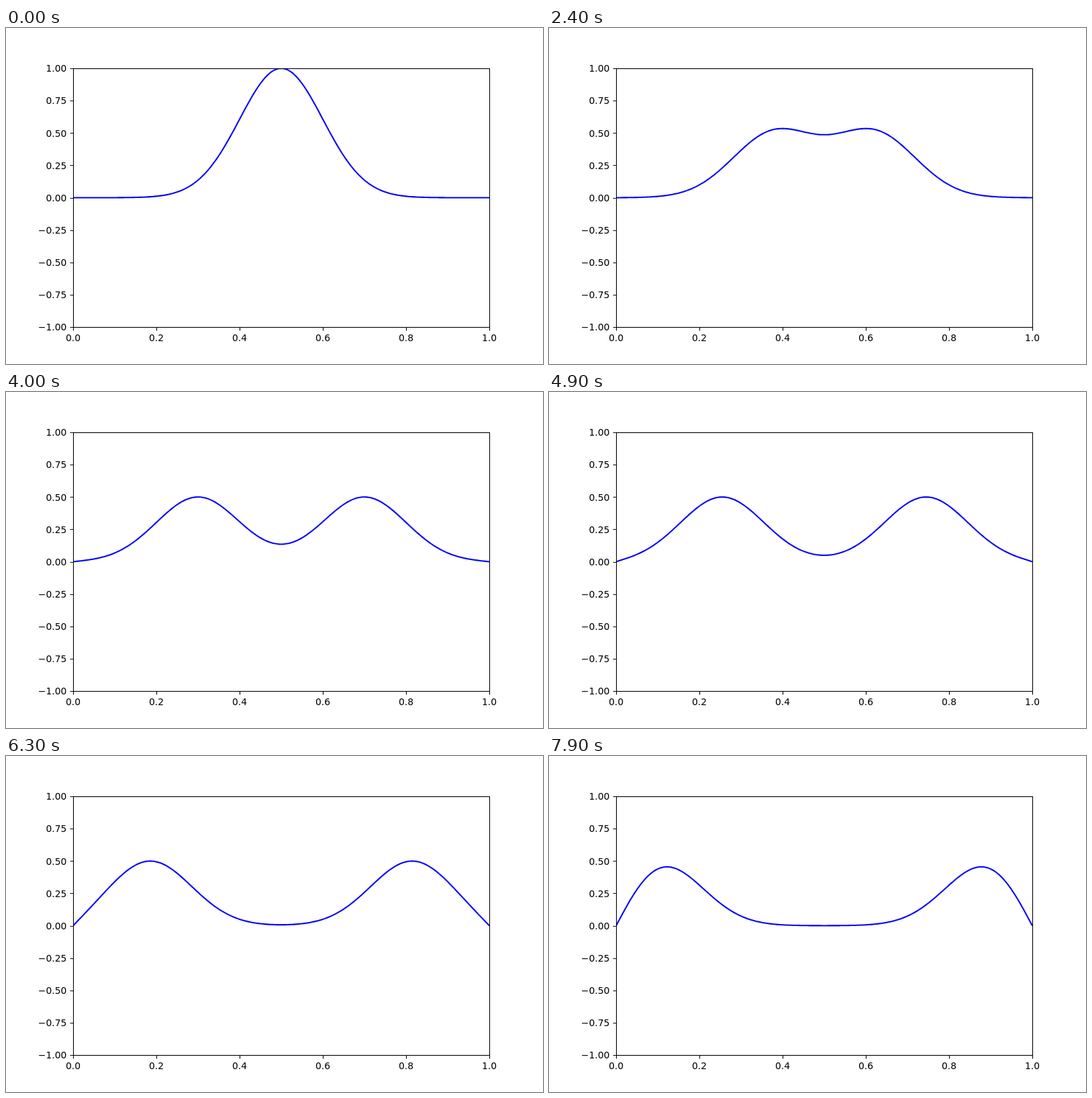
Animation, 800 px wide and 500 px high, one loop 8 s. Source, as an HTML page:

```html
<!DOCTYPE html>
<html lang="en">
<head>
<meta charset="utf-8">
<title>Vibrating string</title>
<style>
  html, body { margin: 0; width: 100%; height: 100%; overflow: hidden; background: #fff; }
  svg { display: block; }
  text { font: 13.889px "DejaVu Sans", sans-serif; fill: #000; }
  .axis { fill: none; stroke: #000; stroke-width: 1.11; }
  #wave { fill: none; stroke: #00f; stroke-width: 2.083; stroke-linejoin: round; }
</style>
</head>
<body>
<svg width="800" height="500" viewBox="0 0 800 500">
  <clipPath id="plot"><rect x="100" y="60" width="620" height="385"/></clipPath>
  <path id="wave" clip-path="url(#plot)"/>
  <path id="ticks" class="axis"/>
  <rect class="axis" x="100.5" y="60.5" width="620" height="385"/>
  <g id="labels"></g>
</svg>
<script>
const LOOP = 8000, STEP = 100, SHIFT = 0.005, SAMPLES = 200;
const byId = id => document.getElementById(id);
const px = x => 100 + 620 * x;
const py = y => 252.5 - 192.5 * y;

function addLabel(value, digits, x, y, anchor) {
  const label = document.createElementNS("http://www.w3.org/2000/svg", "text");
  label.setAttribute("x", x);
  label.setAttribute("y", y);
  label.setAttribute("text-anchor", anchor);
  label.textContent = value.toFixed(digits).replace("-", "\u2212");
  byId("labels").append(label);
}

function drawAxes() {
  let d = "";
  for (let i = 0; i <= 5; i++) {
    const x = Math.round(px(i / 5));
    d += `M${x + 0.5} 445.5v5`;
    addLabel(i / 5, 1, x, 466, "middle");
  }
  for (let i = -4; i <= 4; i++) {
    const y = py(i / 4);
    d += `M100.5 ${Math.round(y) + 0.5}h-5`;
    addLabel(i / 4, 2, 90.3, Math.round(y + 5.3), "end");
  }
  byId("ticks").setAttribute("d", d);
}

// Gaussian pulse, extended as an odd function past both fixed ends
const pulse = x => Math.exp(-((x - 0.5) ** 2) / 0.02);
const extended = x => x < 0 ? -pulse(-x) : x > 1 ? -pulse(2 - x) : pulse(x);

function drawWave(shift) {
  const points = [];
  for (let i = 0; i <= SAMPLES; i++) {
    const x = i / SAMPLES;
    const y = (extended(x - shift) + extended(x + shift)) / 2;
    points.push(px(x).toFixed(2) + " " + py(y).toFixed(3));
  }
  byId("wave").setAttribute("d", "M" + points.join("L"));
}

function tick() {
  drawWave(Math.floor(performance.now() % LOOP / STEP) * SHIFT);
  requestAnimationFrame(tick);
}

drawAxes();
tick();
</script>
</body>
</html>
```
